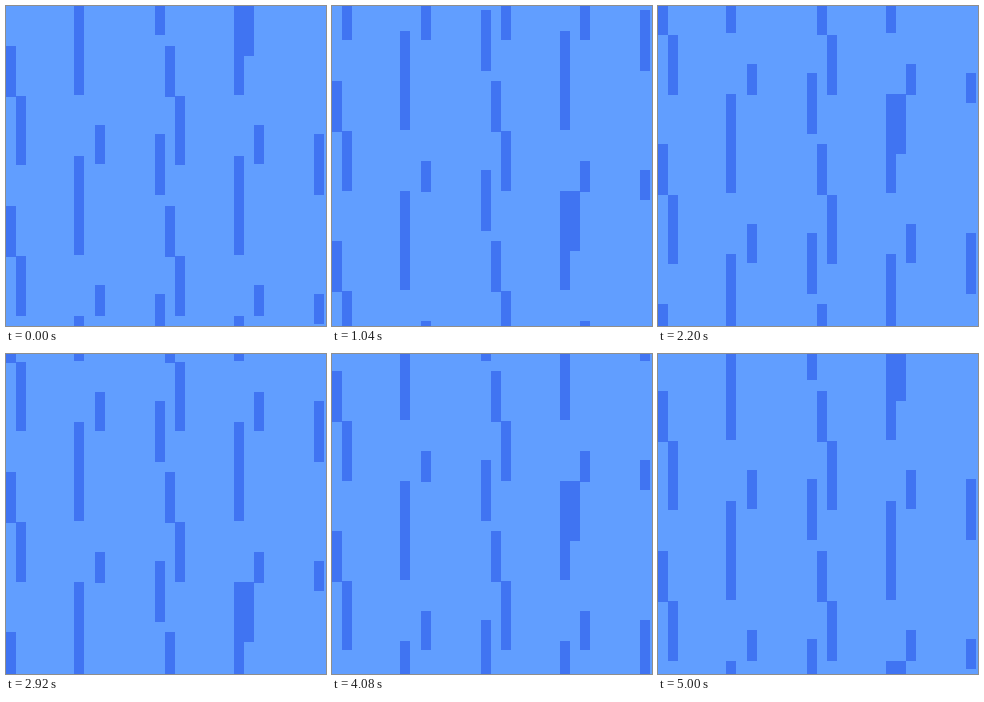
These frames come from a looping animation (320 by 320 pixels, 8000 ms). An HTML page with a canvas:

```html
<!DOCTYPE html>
<html lang="en">
<head>
<meta charset="utf-8">
<title>Falling bars</title>
<style>
html, body { margin: 0; width: 100%; height: 100%; overflow: hidden; background: #619eff; }
canvas { display: block; }
</style>
</head>
<body>
<canvas id="stage" width="320" height="320"></canvas>
<script>
const SIZE = 320, BAR_WIDTH = 10;
const COLUMN_STEP = 159.5, ROW_STEP = 160;
const LOOP = 8000, SCROLL_TIME = 5000, FRAME = 40;
const TICKS_PER_SECOND = 48, TICK_PX = 3.9875;

// One tile of bars, repeated two across and two down; heights cycle over the copies
const tile = [
  { x: 0, top: 39.5, heights: [51] },
  { x: 10, top: 89.9, heights: [69, 60] },
  { x: 68.8, top: 149.5, heights: [99] },
  { x: 89, top: 119.4, heights: [39, 31] },
  { x: 149.3, top: 128.4, heights: [61, 61, 61, 30] }
];

const ctx = document.getElementById("stage").getContext("2d");

// Draws a rectangle and its wrapped copies above
function fallingRect(x, top, width, height, shift) {
  for (let y = top + shift; y + height > 0; y -= SIZE) {
    const from = Math.round(y);
    ctx.fillRect(Math.floor(x), from, width, Math.round(y + height) - from);
  }
}

function draw(time) {
  const frameTime = Math.floor(Math.min(time, SCROLL_TIME) / FRAME) * FRAME;
  const shift = Math.floor(frameTime * TICKS_PER_SECOND / 1000) * TICK_PX;
  ctx.fillStyle = "#619eff";
  ctx.fillRect(0, 0, SIZE, SIZE);
  ctx.fillStyle = "#4074f2";
  for (const { x, top, heights } of tile) {
    for (let copy = 0; copy < 4; copy++) {
      const column = copy >> 1, row = copy & 1;
      fallingRect(x + column * COLUMN_STEP, top + row * ROW_STEP,
        BAR_WIDTH, heights[copy % heights.length], shift);
    }
  }
  // The one double-width block
  fallingRect(228, -10.2, 2 * BAR_WIDTH, 60, shift);
}

const start = performance.now();
function tick() {
  draw((performance.now() - start) % LOOP);
  requestAnimationFrame(tick);
}
tick();
</script>
</body>
</html>
```
